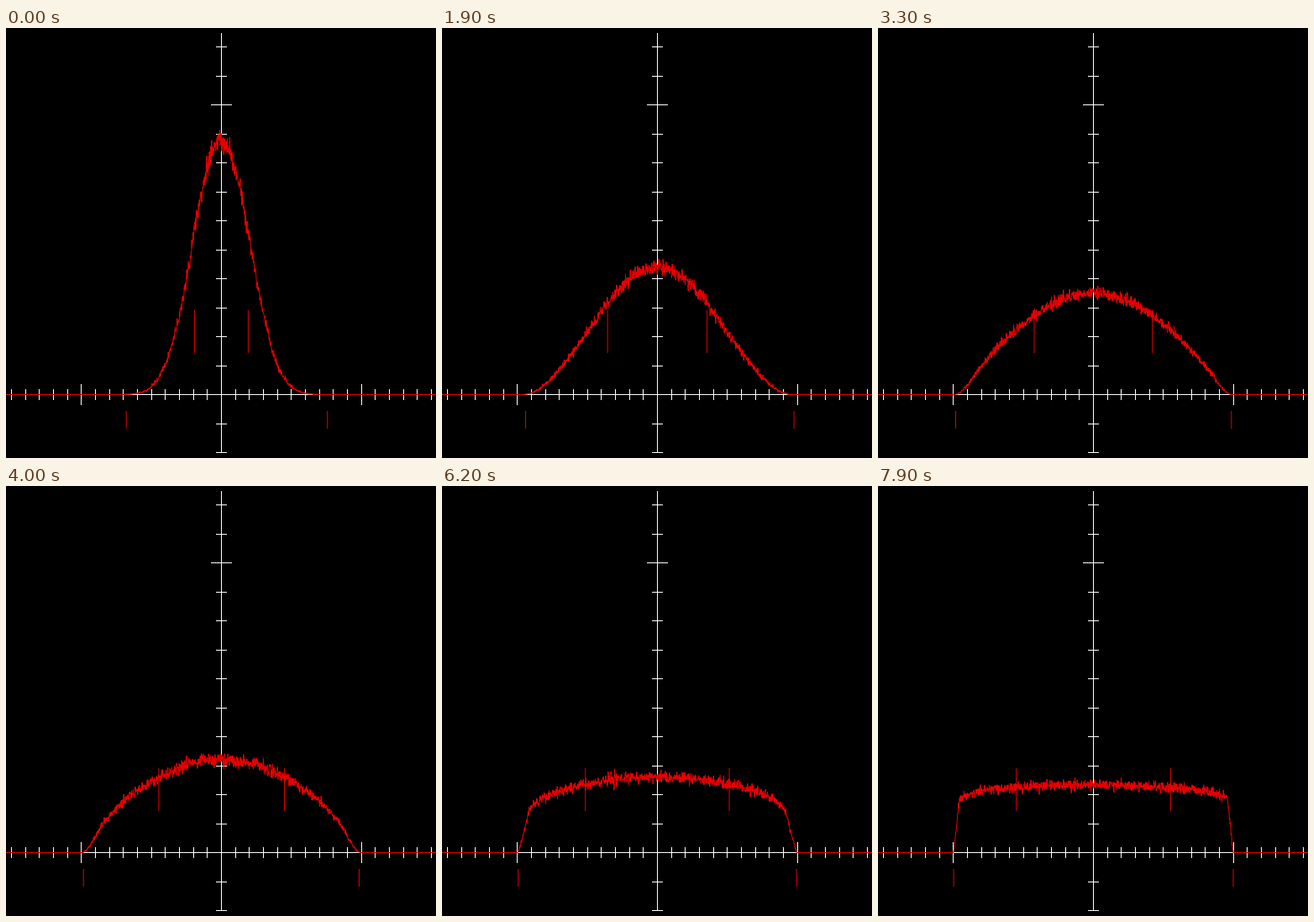
A matplotlib script that plays this animation: 512 px wide and 512 px high, repeating every 8 s.

```python
import numpy as np
import matplotlib.pyplot as plt
from matplotlib.animation import FuncAnimation

SIZE, DPI = 512, 100
FRAMES, INTERVAL = 80, 100
X0, Y0 = 256, 436              # origin pixel
UX, UY = 500 / 3, 345.0        # pixels per unit
LEVEL = 75.0                   # height of the uniform density
SUB = 3                        # histogram bins per pixel
CHAINS, WARMUP, STEPS = 15000, 22, 40
PX = 72 / DPI
RED = "#e60000"


def simulate(i):
    """Values of a signal pulled towards random targets by random amounts."""
    rng = np.random.default_rng(100 + i)
    p = (i + 6) / 100
    power = p / (1 - p) * (2.3 + 1.35 * p * p)
    least = 0.14 * (1 - p)
    x = rng.uniform(-1, 1, CHAINS)
    out = np.empty((STEPS, CHAINS))
    for n in range(-WARMUP, STEPS):
        goal = rng.uniform(-1, 1, CHAINS)
        keep = least + (1 - least) * rng.random(CHAINS) ** power
        x = goal + (x - goal) * keep
        if n >= 0:
            out[n] = x
    return out.ravel()


def measure(i):
    x = simulate(i)
    bins = ((x * UX + X0 + 0.5) * SUB).astype(int)
    count = np.bincount(bins, minlength=SIZE * SUB)
    height = count * LEVEL * 2 * UX * SUB / x.size
    few = x[::6]
    return Y0 + 0.5 - height, x.mean(), x.std(), few.min(), few.max()


data = [measure(i) for i in range(FRAMES)]

fig = plt.figure(figsize=(SIZE / DPI, SIZE / DPI), dpi=DPI, facecolor="black")
ax = fig.add_axes([0, 0, 1, 1])
ax.set_xlim(0, SIZE)
ax.set_ylim(SIZE, 0)
ax.axis("off")


def line(xs, ys, color=RED, z=3):
    return ax.plot(xs, ys, color=color, lw=PX, solid_capstyle="butt",
                   snap=False, zorder=z)[0]


def hline(y, left, right):
    y = np.floor(y + 0.5) + 0.5
    line([left, right + 1], [y, y], "white", 2)


def vline(x, top, bottom):
    x = np.floor(x + 0.5) + 0.5
    line([x, x], [top, bottom + 1], "white", 2)


def reach(n):
    return 12 if abs(n) == 10 else 6


hline(Y0, 0, SIZE)
vline(X0, 6, 505)
for n in range(-15, 16):
    if n:
        vline(X0 + n * UX / 10, Y0 - reach(n), Y0 + reach(n))
for n in range(-2, 13):
    if n:
        hline(Y0 - n * UY / 10, X0 - reach(n), X0 + reach(n))

grid = (np.arange(SIZE * SUB) + 0.5) / SUB
curve = line(grid, np.full(grid.size, Y0 + 0.5))
spread = [line([X0, X0], [336, 387]) for _ in range(2)]
limits = [line([X0, X0], [456, 477]) for _ in range(2)]


def draw(i):
    ys, mean, std, low, high = data[i]
    curve.set_ydata(ys)
    marks = (mean - std, mean + std, low, high)
    for mark, v in zip(spread + limits, marks):
        mark.set_xdata([X0 + 0.5 + v * UX] * 2)
    return [curve, *spread, *limits]


anim = FuncAnimation(fig, draw, frames=FRAMES, interval=INTERVAL,
                     repeat=True, repeat_delay=0)
plt.show()
```
